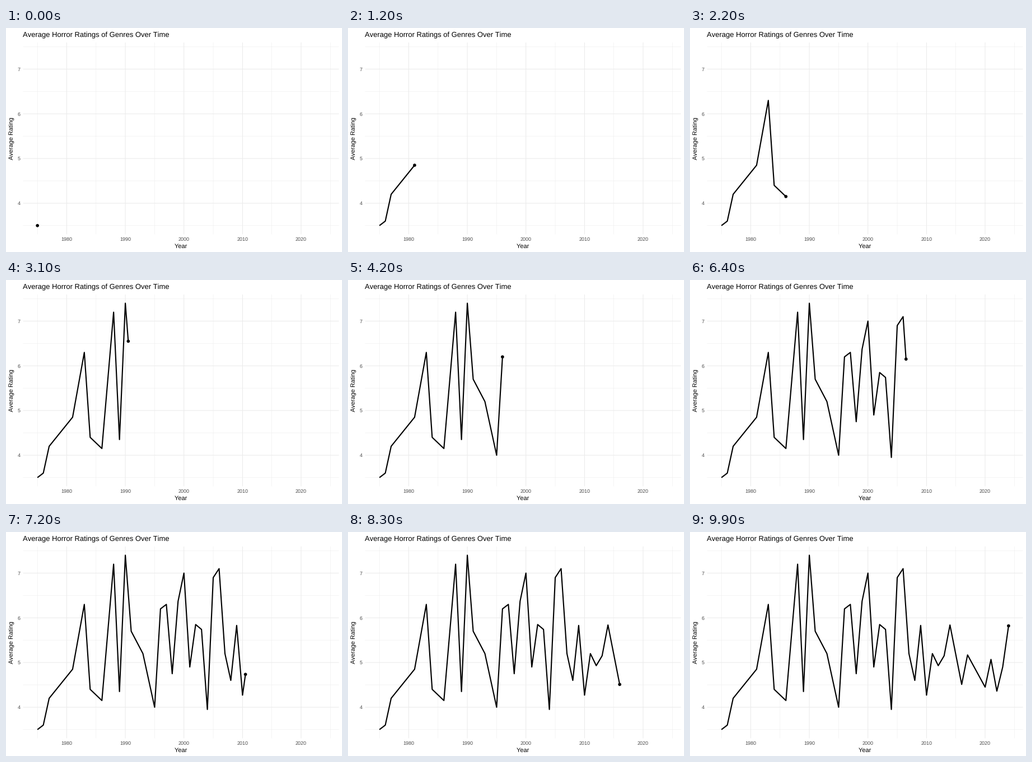
A matplotlib script that plays this animation: 600x400 px, repeating every 10 s.

```python
import matplotlib.pyplot as plt
import numpy as np
from matplotlib.animation import FuncAnimation
from matplotlib.patches import Circle

W, H, DPI = 600, 400, 100
FRAMES, INTERVAL = 100, 100
PT = 72 / DPI  # points per pixel
LEFT, RIGHT, TOP, BOTTOM = 30.5, 594.5, 25.9, 368.4
GRID, TICK_TEXT = "#ebebeb", "#4d4d4d"

plt.rcParams.update({
    "font.family": "Liberation Sans",
    "text.hinting": "none",
    "text.hinting_factor": 1,
    "text.kerning_factor": 6,  # practically no kerning
})

# The curve bends once a year, except in years on a straight stretch.
STRAIGHT = {1978, 1979, 1980, 1982, 1985, 1987, 1992, 1994, 2015, 2018, 2019}
years = np.array([y for y in range(1975, 2025) if y not in STRAIGHT])
ratings = np.array([
    3.5, 3.6, 4.2, 4.85, 6.3, 4.4, 4.15, 7.2, 4.35, 7.4, 5.7, 5.2, 4,
    6.2, 6.3, 4.75, 6.37, 7, 4.9, 5.85, 5.74, 3.95, 6.9, 7.1, 5.2, 4.6,
    5.83, 4.27, 5.2, 4.93, 5.15, 5.84, 4.51, 5.17, 4.45, 5.07, 4.36, 4.9, 5.82])


def scale(values, start, end):
    """Linear scale to pixels with 5% padding on both sides."""
    lo, hi = values.min(), values.max()
    pad = 0.05 * (hi - lo)
    return lambda v: start + (v - lo + pad) / (hi - lo + 2 * pad) * (end - start)


sx = scale(years, LEFT, RIGHT)
sy = scale(ratings, BOTTOM, TOP)
px, py = sx(years), sy(ratings)

# Each bend is reached on a whole frame.
keys = np.round((FRAMES - 1) * (years - years[0]) / (years[-1] - years[0]))

fig = plt.figure(figsize=(W / DPI, H / DPI), dpi=DPI, facecolor="white")
ax = fig.add_axes([0, 0, 1, 1])
ax.set_xlim(0, W)
ax.set_ylim(H, 0)
ax.axis("off")


def rule(xs, ys, width):
    ax.plot(xs, ys, color=GRID, lw=width * PT, solid_capstyle="butt",
            snap=False, zorder=1)


def vline(year, width):
    rule([sx(year)] * 2, [TOP, BOTTOM], width)


def hline(rating, width):
    rule([LEFT, RIGHT], [sy(rating)] * 2, width)


def label(x, y, text, size, color="black", ha="center", rotation=0):
    ax.text(x, y, text, fontsize=size * PT, color=color, ha=ha, va="baseline",
            rotation=rotation, rotation_mode="anchor")


for year in range(1975, 2026, 10):
    vline(year, 0.53)
for rating in np.arange(3.5, 8):
    hline(rating, 0.53)
for year in range(1980, 2021, 10):
    vline(year, 1.07)
    label(sx(year), 379.9, str(year), 8.8, TICK_TEXT)
for rating in range(4, 8):
    hline(rating, 1.07)
    label(25.6, sy(rating) + 3.2, str(rating), 8.8, TICK_TEXT, ha="right")

label(LEFT - 0.2, 16, "Average Horror Ratings of Genres Over Time", 13.2, ha="left")
label((LEFT + RIGHT) / 2, 392.6, "Year", 11)
label(14, (TOP + BOTTOM) / 2, "Average Rating", 11, rotation=90)

line, = ax.plot([], [], color="black", lw=2.13 * PT, solid_capstyle="butt",
                solid_joinstyle="round", snap=False, zorder=3)
dot = ax.add_patch(Circle((px[0], py[0]), 2.85, color="black", lw=0, zorder=4))


def update(i):
    x, y = np.interp(i, keys, px), np.interp(i, keys, py)
    done = keys < i
    line.set_data(np.append(px[done], x), np.append(py[done], y))
    dot.center = x, y
    return line, dot


anim = FuncAnimation(fig, update, frames=FRAMES, interval=INTERVAL,
                     repeat=True, repeat_delay=0, blit=False)
plt.show()
```
